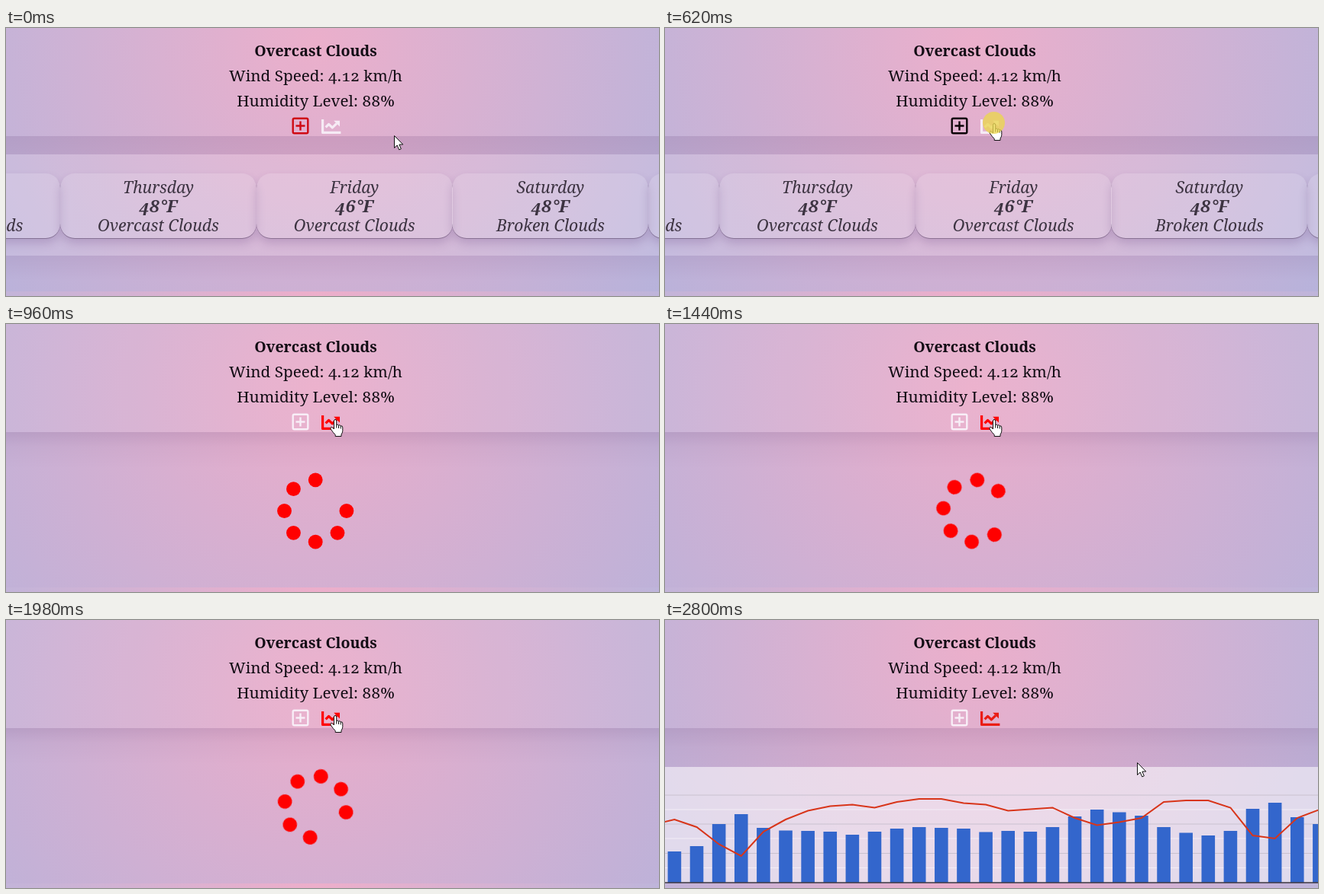
Write an HTML page that moves like this. It is 855 px wide and 352 px high and loops after 2.87 s.

```html
<!DOCTYPE html>
<html lang="en">
<head>
<meta charset="utf-8">
<title>Weather forecast</title>
<style>
  html, body { margin: 0; width: 100%; height: 100%; overflow: hidden; }
  body { position: relative; font: 20.7px/33px "Noto Serif", serif; font-variant-numeric: oldstyle-nums; color: #120c14; }
  .scene, svg { position: absolute; left: 0; top: 0; width: 855px; height: 352px; overflow: hidden; }
  .scene, .timed { animation: 2870ms step-end infinite; }
  .scene { background: radial-gradient(circle var(--r) at 405px var(--cy), #ebadca, #94b6e6); }
  .scene > div, .footer, .header { position: absolute; left: 0; width: 855px; }

  #forecast { --r: 930px; --cy: 20px; animation-name: forecast; }
  #loading { --r: 1000px; --cy: 85px; animation-name: loading; }
  #hourly { --r: 950px; --cy: 35px; animation-name: hourly; }
  @keyframes forecast { 0% { visibility: visible } 26.11%, 100% { visibility: hidden } }
  @keyframes loading { 0% { visibility: hidden } 26.11% { visibility: visible } 76.29%, 100% { visibility: hidden } }
  @keyframes hourly { 0% { visibility: hidden } 76.29%, 100% { visibility: visible } }

  .top { top: 0; height: 142px; background: rgba(255,255,255,.02); }
  #loading .top { background: rgba(255,255,255,.06); }
  .band { top: 142px; height: 24px; background: linear-gradient(rgba(70,35,90,.13), rgba(70,35,90,.1)); }
  #loading .band { height: 48px; background: linear-gradient(rgba(70,35,90,.13), rgba(70,35,90,.04) 40%, transparent); }
  #hourly .band { height: 51px; background: linear-gradient(rgba(70,35,90,.13), rgba(70,35,90,.05) 50%, rgba(70,35,90,.03)); }
  .panel { top: 166px; height: 133px; background: rgba(255,255,255,.12); overflow: hidden; }
  .below { top: 299px; height: 47px; background: linear-gradient(rgba(70,35,90,.08), transparent 70%); }
  .footer { top: 346px; height: 6px; background: radial-gradient(circle 850px at 405px 20px, #eeaeca, #94bbe9); }

  .card { position: absolute; top: 25px; width: 257px; height: 80px; padding-top: 5px; border-radius: 19px;
    text-align: center; font-style: italic; font-size: 21.1px; line-height: 25px; color: #3c3341; background: rgba(255,255,255,.13);
    box-shadow: 0 1px 0 rgba(60,40,70,.4), 0 7px 12px rgba(90,55,120,.22); }
  .card b, .card span { display: block; white-space: nowrap; }
  .card b { font-size: 22.6px; }

  .header { top: 13px; width: 811px; text-align: center; }
  .header b { font-size: 19.6px; }
  .header div { height: 33px; white-space: nowrap; }

  #add { color: #cf0a14; animation-name: add; }
  #trend { color: #f6ebf5; animation-name: trend; }
  @keyframes add { 0% { color: #cf0a14 } 21.58% { color: #0d0508 } 26.11%, 100% { color: #f8eef7 } }
  @keyframes trend { 0% { color: #f6ebf5 } 26.11% { color: #f9a3b0 } 28.55% { color: #fb5560 } 31% { color: #fd2025 }
    33.42% { color: #f00 } 76.29% { color: #d8201a } 95.1%, 100% { color: #ea1c14 } }

  #click { animation-name: click; }
  @keyframes click { 0% { visibility: hidden } 21.58% { visibility: visible } 26.11%, 100% { visibility: hidden } }

  #ring { transform-origin: 405.2px 245.5px; animation-name: ring; }
  @keyframes ring {
    0% { transform: rotate(-20deg) } 28.55% { transform: rotate(-10deg) } 33.42% { transform: rotate(0) }
    35.52% { transform: rotate(10deg) } 38.3% { transform: rotate(20deg) } 43.18% { transform: rotate(30deg) }
    48.06% { transform: rotate(40deg) } 50.15% { transform: rotate(50deg) } 55.03% { transform: rotate(60deg) }
    57.12% { transform: rotate(70deg) } 62% { transform: rotate(80deg) } 66.88% { transform: rotate(90deg) }
    68.97%, 100% { transform: rotate(100deg) }
  }

  #arrow { animation-name: arrow; }
  #hand { animation-name: hand; }
  @keyframes arrow {
    0% { transform: translate(508px,141px); visibility: visible } 2.42% { transform: translate(501px,141px) }
    4.86% { transform: translate(481px,139px) } 6.95% { transform: translate(460px,134px) }
    9.38% { transform: translate(443px,129px); visibility: visible }
    11.82% { transform: translate(433px,125px); visibility: hidden }
    95.1% { transform: translate(528px,155px); visibility: visible }
    97.54%, 100% { transform: translate(618px,187px); visibility: visible }
  }
  @keyframes hand {
    0% { transform: translate(424px,125px); visibility: hidden }
    11.82% { transform: translate(427px,125px); visibility: visible }
    14.26% { transform: translate(424px,125px); visibility: visible }
    95.1%, 100% { transform: translate(424px,125px); visibility: hidden }
  }
</style>
</head>
<body>
<div class="scene" id="forecast">
  <div class="top"></div><div class="band"></div>
  <div class="panel"></div><div class="below"></div>
</div>

<div class="scene" id="loading">
  <div class="top"></div><div class="band"></div>
  <svg><g id="ring" class="timed" fill="red"></g></svg>
</div>

<div class="scene" id="hourly">
  <div class="top"></div><div class="band"></div>
  <svg>
    <rect y="193" width="855" height="152" fill="#fff" opacity=".53"/>
    <path d="M0 249H855M0 287H855M0 325.5H855" stroke="#f3edf6"/>
    <path d="M0 230H855M0 268H855M0 306.5H855" stroke="#c9c1cf"/>
    <g id="bars" fill="#36c"></g>
    <path d="M0 345H855" stroke="#3c3740" stroke-width="1.3"/>
    <polyline id="line" fill="none" stroke="#d8351a" stroke-width="2"/>
  </svg>
</div>

<div class="footer"></div>
<div class="header">
  <div><b>Overcast Clouds</b></div>
  <div>Wind Speed: 4.12 km/h</div>
  <div>Humidity Level: 88%</div>
</div>

<svg>
  <g id="add" class="timed" fill="none" stroke="currentColor" stroke-width="2.4">
    <rect x="375.7" y="118.7" width="19.6" height="19.6" rx="1.8"/>
    <path d="M379.5 128.5H391.5M385.5 122.5V134.5"/>
  </g>
  <g id="trend" class="timed" fill="none" stroke="currentColor" stroke-width="3.2" stroke-linejoin="round">
    <path d="M414.6 120V137.4H438.4"/>
    <path d="M418.6 130.3L422.6 126.4L427.3 130.9L433 125.3"/>
    <path d="M429.2 121.8H437V129.4Z" fill="currentColor" stroke="none"/>
  </g>
  <path id="arrow" class="timed" d="M.5 .5V16.5L4.2 13L6.7 18.9L9.3 17.8L6.9 12H11.8Z" fill="#fff" stroke="#111"/>
  <g id="hand" class="timed" stroke="#111" stroke-linejoin="round">
    <path fill="#fff" d="M5.5 13V2.2Q5.5.5 7.1.5T8.7 2.2V7.5Q10.3 6.2 11.4 8Q13.2 7 14.1 8.8Q16.8 8.2 16.8 11V15.5Q16.6 18 15 20V22.5H7.2V20.5Q4.5 18 1.2 13Q.2 11.1 1.8 10.5Q3.5 10.2 5.5 13Z"/>
    <path d="M8.7 7.5V11.5M11.5 8V12M14.2 9V12.5" fill="none"/>
  </g>
  <circle id="click" class="timed" cx="430.5" cy="124.5" r="14.5" fill="#ead64e" opacity=".78"/>
</svg>

<script>
  const days = [
    ["Wednesday", "48°F", "Overcast Clouds"],
    ["Thursday", "48°F", "Overcast Clouds"],
    ["Friday", "46°F", "Overcast Clouds"],
    ["Saturday", "48°F", "Broken Clouds"],
    ["Sunday", "47°F", "Broken Clouds"]
  ];
  document.querySelector(".panel").innerHTML = days.map(([day, temp, sky], i) =>
    `<div class="card" style="left:${-185.7 + i * 256.7}px"><span>${day}</span><b>${temp}</b><span>${sky}</span></div>`
  ).join("");

  // Eight places on the circle, the upper right one left empty.
  document.getElementById("ring").innerHTML = Array.from({ length: 7 }, (_, i) => {
    const angle = i * Math.PI / 4;
    return `<circle cx="${405.2 + 40.7 * Math.cos(angle)}" cy="${245.5 + 40.7 * Math.sin(angle)}" r="9.4"/>`;
  }).join("");

  const step = 29.12, firstBar = 3.6, barWidth = 17.6, axisY = 345;
  const barTops = [304, 297, 268, 255, 273, 276.5, 277, 278, 282, 278, 274, 272, 273, 274, 278.5,
    277, 278, 272, 258, 249, 252.5, 257, 272, 279.5, 283, 277, 248, 240, 259, 268];
  const lineYs = [269, 262, 272, 294.5, 310, 278, 262, 250.5, 244.5, 242.5, 246.5, 239, 235, 235, 240.5, 242.5,
    250.5, 248.5, 246.5, 260, 269.5, 265.5, 260, 239, 237, 237, 246.5, 283, 287, 260, 249];
  document.getElementById("bars").innerHTML = barTops.map((y, i) =>
    `<rect x="${firstBar + i * step}" y="${y}" width="${barWidth}" height="${axisY - y}"/>`).join("");
  document.getElementById("line").setAttribute("points",
    lineYs.map((y, i) => `${firstBar + barWidth / 2 + (i - 1) * step},${y}`).join(" "));
</script>
</body>
</html>
```
